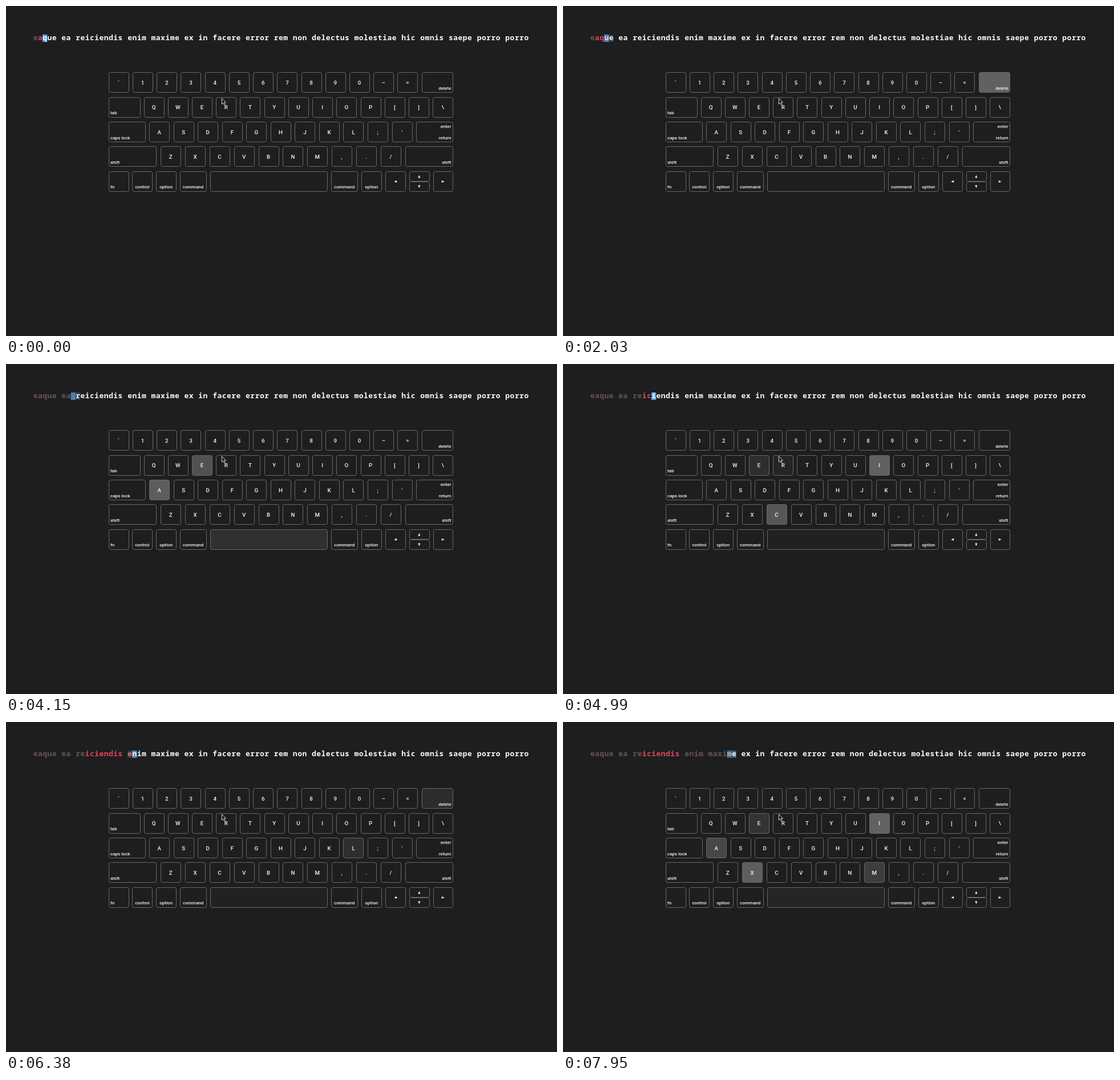
Recreate the animation shown at these times as an HTML page. Size 966 by 579 pixels, loop 8 s.

```html
<!DOCTYPE html>
<html lang="en">
<head>
<meta charset="utf-8">
<title>Typing practice</title>
<style>
  html, body { margin: 0; width: 100%; height: 100%; overflow: hidden; background: #1e1e1e; }
  svg { display: block; width: 966px; height: 579px; }
  .line { font: 600 13px "Noto Sans Mono", monospace; text-anchor: middle; }
  .cap { font: 500 9.8px Roboto, sans-serif; fill: #f4f4f4; text-anchor: middle; }
  .word { font: 500 8.1px Roboto, sans-serif; fill: #f4f4f4; }
  .key { stroke: #686868; stroke-width: 1; }
  .arrow { fill: #f4f4f4; }
</style>
</head>
<body>
<svg id="stage" viewBox="0 0 966 579"></svg>
<script>
const LOOP = 8000, FADE = 80, PITCH = 8.277, LEFT = 47.4;
const LINE = "eaque ea reiciendis enim maxime ex in facere error rem non delectus molestiae hic omnis saepe porro porro";
const COLORS = { idle: [250, 250, 250], ok: [104, 84, 88], bad: [226, 68, 90] };
const OFF = [30, 30, 30], LIT = [98, 98, 98];
const stage = document.getElementById("stage");

function add(tag, attrs, text) {
  const el = document.createElementNS("http://www.w3.org/2000/svg", tag);
  for (const k in attrs) el.setAttribute(k, attrs[k]);
  if (text) el.textContent = text;
  stage.appendChild(el);
  return el;
}
const clamp = v => Math.max(0, Math.min(1, v));
const mix = (a, b, p) => "rgb(" + a.map((v, i) => Math.round(v + (b[i] - v) * p)) + ")";
const snapX = v => Math.floor(v + 0.4) + 0.5;
const snapY = v => Math.floor(v) + 0.5;

// Keyboard
const keys = {};
function key(name, x1, x2, y, h = 35) {
  const x = snapX(x1);
  keys[name] = add("rect", {
    class: "key", x, y: snapY(y), width: snapX(x2) - x, height: h, rx: 3, fill: "#1e1e1e"
  });
}
function letters(chars, center, pitch, y) {
  [...chars].forEach((c, i) => {
    const x = center + i * pitch;
    key(c, x - 17.5, x + 17.5, y);
    add("text", { class: "cap", x, y: y + 21.4 }, c);
  });
}
function word(text, x, y, anchor = "start") {
  add("text", { class: "word", x, y, "text-anchor": anchor }, text);
}
function wide(name, x1, x2, y, text, align = "start") {
  key(name, x1, x2, y);
  const x = { start: x1 + 3, middle: (x1 + x2) / 2, end: x2 - 3 }[align];
  if (text) word(text, x, y + 30.2, align);
}
function arrow(x, y, angle) {
  add("path", { class: "arrow", d: "M-2.6 0L2.4 -2V2Z", transform: `translate(${x} ${y}) rotate(${angle})` });
}

const R1 = 116.6, R2 = 160, R3 = 203.4, R4 = 246.8, R5 = 290.2, END = 783.5;
letters("`1234567890–=", 197.4, 42.22, R1);
wide("del", 728.6, END, R1, "delete", "end");
wide("tab", 179.9, 234.6, R2, "tab");
letters("QWERTYUIOP[]\\", 259.1, 42.23, R2);
wide("caps", 179.9, 243.6, R3, "caps lock");
letters("ASDFGHJKL;'", 268.7, 42.55, R3);
wide("ret", 719.5, END, R3, "return", "end");
word("enter", END - 3, R3 + 10.7, "end");
wide("shiftL", 179.9, 263.4, R4, "shift");
letters("ZXCVBNM,./", 288.7, 42.85, R4);
wide("shiftR", 699.8, END, R4, "shift", "end");
wide("fn", 179.9, 214.9, R5, "fn");
wide("ctrl", 221.3, 256.4, R5, "control", "middle");
wide("optL", 263.2, 298.2, R5, "option", "middle");
wide("cmdL", 304.8, 351.5, R5, "command", "middle");
wide(" ", 358.4, 562.9, R5);
wide("cmdR", 569.7, 616.5, R5, "command", "middle");
wide("optR", 623.3, 658.3, R5, "option", "middle");
wide("left", 665, 700, R5);
key("up", 706.8, 741.8, R5, 17);
key("down", 706.8, 741.8, 308.5, 17);
wide("right", 748.6, END, R5);
arrow(682.8, 308, 0);
arrow(724.4, 299.2, 90);
arrow(724.4, 316.9, -90);
arrow(766.2, 308, 180);

// Line of text
const cells = [...LINE].map((c, i) => {
  const x = LEFT + i * PITCH;
  const box = add("rect", { x, y: 50, width: PITCH, height: 13, fill: "#5aa2e4", opacity: 0 });
  return { x, box, c };
});
for (const cell of cells) {
  cell.glyph = add("text", { class: "line", x: cell.x + PITCH / 2, y: 60 }, cell.c);
}

// Mouse pointer
add("path", {
  d: "M378.4 161.8V172L380.7 169.9L382.3 173.4L384 172.6L382.4 169.2H385.4Z",
  fill: "#111", stroke: "#eee", "stroke-width": 0.9, "stroke-linejoin": "round"
});

// Keystrokes: time, key, outcome (ok, bad, back; none = glow only)
const strokes = [];
function type(outcome, chars, ...times) {
  times.forEach((t, i) => strokes.push({ t, key: chars[i], outcome }));
}
type("bad", "UE ", 190, 330, 500);
type("back", Array(5).fill("del"), 1850, 1968, 2090, 2210, 2330);
type("ok", "EAQUE ", 2570, 2670, 2995, 3130, 3250, 3430);
type("ok", "EA RE", 3780, 3880, 4130, 4270, 4410);
type("bad", "CIENDIS LL", 4660, 4770, 5030, 5130, 5230, 5330, 5440, 5550, 5650, 5800);
type("back", ["del"], 6364);
type("ok", "ENIM ", 6610, 6720, 6890, 7100, 7230);
type("ok", "MAXIM", 7390, 7530, 7690, 7800, 7915);
type("", "E", 7926);

function glow(age) {
  return age < 0 ? 0 : Math.min(1, age / FADE) / (1 + (age / 460) ** 5);
}

function draw(t) {
  const level = {};
  const state = cells.map(() => ({ from: "idle", to: "idle", at: -FADE, on: 0, onAt: -FADE }));
  const mark = (i, to, at) => Object.assign(state[i], { from: state[i].to, to, at });
  const focus = (i, on, at) => Object.assign(state[i], { on, onAt: at });
  let pos = 2;
  mark(0, "ok", -FADE);
  mark(1, "bad", -FADE);
  focus(2, 1, -FADE);

  for (const s of strokes) {
    level[s.key] = Math.max(level[s.key] || 0, glow(t - s.t));
    if (s.t > t || !s.outcome) continue;
    focus(pos, 0, s.t);
    if (s.outcome === "back") mark(--pos, "idle", s.t);
    else mark(pos++, s.outcome, s.t);
    focus(pos, 1, s.t);
  }

  for (const name in level) keys[name].setAttribute("fill", mix(OFF, LIT, level[name]));
  state.forEach((s, i) => {
    const p = clamp((t - s.onAt) / FADE);
    cells[i].box.setAttribute("opacity", s.on ? p : s.onAt < 0 ? 0 : 1 - p);
    cells[i].glyph.setAttribute("fill", mix(COLORS[s.from], COLORS[s.to], clamp((t - s.at) / FADE)));
  });
}

const start = performance.now();
function tick() {
  draw((performance.now() - start) % LOOP);
  requestAnimationFrame(tick);
}
tick();
</script>
</body>
</html>
```
